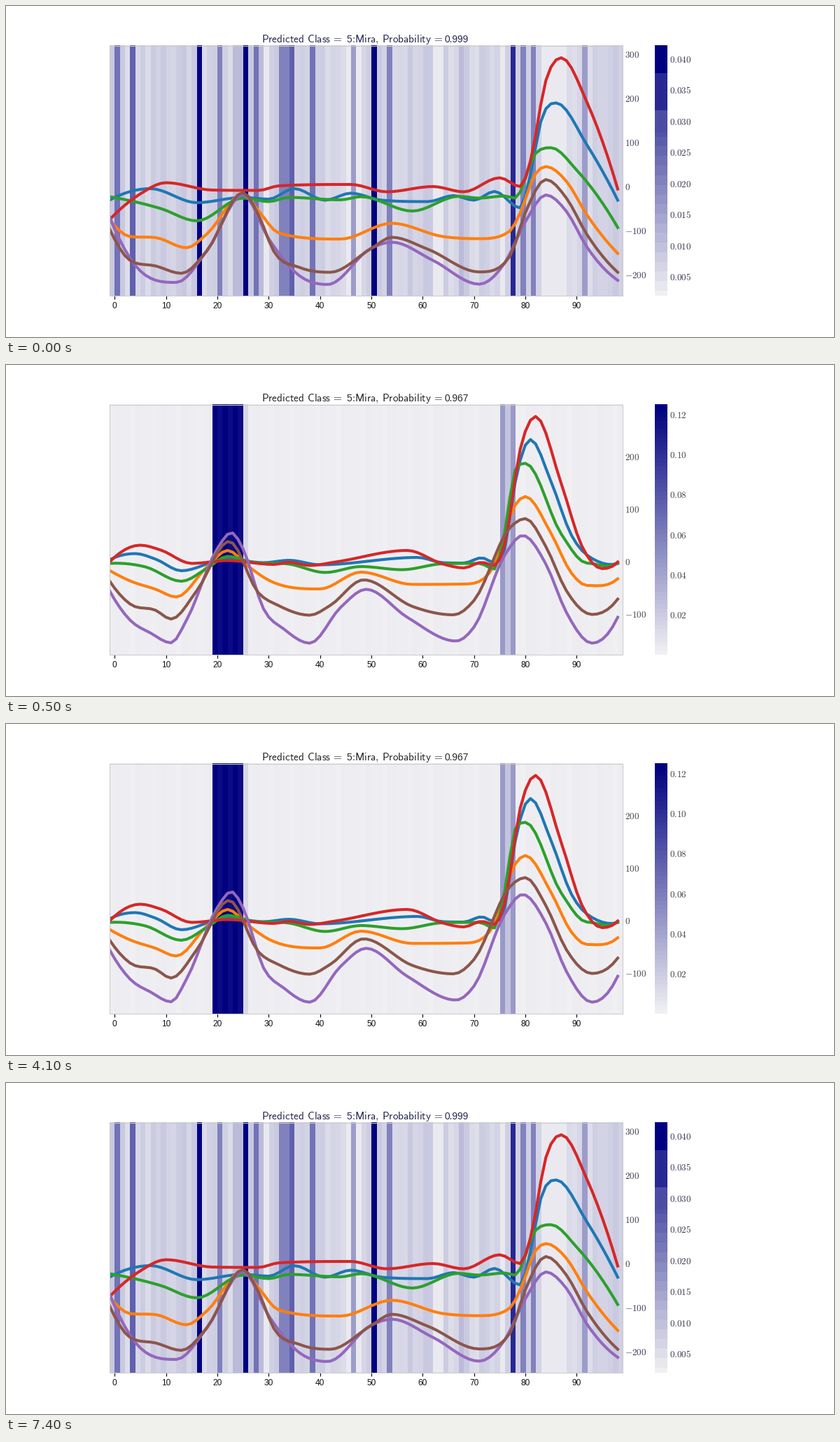
A matplotlib script that plays this animation: 1183 by 473 pixels, repeating every 8000 ms.

```python
import numpy as np
import matplotlib.pyplot as plt
from matplotlib.animation import FuncAnimation
from matplotlib.colors import LinearSegmentedColormap
from matplotlib.patches import Rectangle

plt.rcParams["mathtext.fontset"] = "cm"

W, H, DPI = 1183, 473, 100
PX = 72 / DPI                                   # points per pixel
LEFT, RIGHT = 0.125 * W, 0.745 * W
TOP, BOTTOM = 0.12 * H, 0.875 * H
STEP = (RIGHT - LEFT) / 100
BAR_LEFT = 0.78375 * W
BAR_RIGHT = BAR_LEFT + (BOTTOM - TOP) / 20
NAVY = LinearSegmentedColormap.from_list("navy", ["#f0f0f3", "#000080"])
BLUE, ORANGE, GREEN = "#1f77b4", "#ff7f0e", "#2ca02c"
RED, PURPLE, BROWN = "#d62728", "#9467bd", "#8c564b"

fig = plt.figure(figsize=(W / DPI, H / DPI), dpi=DPI, facecolor="white")
ax = fig.add_axes([0, 0, 1, 1])
ax.axis("off")
frame_box = Rectangle((LEFT, TOP), RIGHT - LEFT, BOTTOM - TOP, fill=False,
                      ec="#cccccc", lw=1.1 * PX, zorder=5)
ax.add_patch(frame_box)


def to_px(x):
    return LEFT + STEP * (np.asarray(x) + 1)


def label(x, y, body, size=9.5, color="#333333", ha="left"):
    return ax.text(x, y, body, fontsize=size, color=color, ha=ha,
                   va="baseline", family="Liberation Sans", zorder=6)


def curve(color, *keys):
    """Monotone cubic through x, y keys, sampled once per time step."""
    kx, ky = np.array(keys, float).reshape(-1, 2).T
    secant = np.diff(ky) / np.diff(kx)
    before, after = secant[:-1], secant[1:]
    limit = 3 * np.minimum(abs(before), abs(after)) * (before * after > 0)
    slope = np.gradient(ky, kx, edge_order=2)
    slope[1:-1] = np.clip(slope[1:-1], -limit, limit)

    x = np.arange(-1, 99)
    i = np.clip(np.searchsorted(kx, x, side="right") - 1, 0, len(kx) - 2)
    h = kx[i + 1] - kx[i]
    t = (x - kx[i]) / h
    ease = t * t * (3 - 2 * t)
    y = (ky[i] + (ky[i + 1] - ky[i]) * ease
         + h * t * (1 - t) * ((1 - t) * slope[i] - t * slope[i + 1]))
    line, = ax.plot(to_px(x), y + 0.5, color=color, lw=4.1 * PX, zorder=3)
    line.set_clip_path(frame_box)
    return line


def shade(levels, left, right):
    return ax.imshow(levels, cmap=NAVY, vmin=0, vmax=1,
                     extent=(left, right, BOTTOM, TOP), aspect="auto",
                     interpolation="nearest", zorder=1)


def title(prob, color):
    gap, pad = r"\hspace{0.38}", r"\hspace{0.18}"
    head = rf"$\mathsf{{Predicted}}{gap}\mathsf{{Class}}{pad}=$"
    tail = (rf"$\text{{:}}\mathsf{{Mira}}{{,}}{gap}"
            rf"\mathsf{{Probability}}{pad}=$")
    return [label(365, 51.5, head, 11, color),
            label(486.7, 51.5, "5", 9.9, color),
            label(494.5, 51.5, tail, 11, color),
            label(627, 51.5, prob, 9.9, color)]


def scale(x, y0, dy, values, fmt, color):
    return [label(x, y0 + dy * k + 4.5, f"${v:{fmt}}$", color=color)
            for k, v in enumerate(values)]


def spread_scene():
    levels = np.random.default_rng(4).uniform(0.07, 0.17, 100)
    levels[[30, 46, 48, 63, 64, 76]] = levels[84:89] = 0.03
    strong = {1: (17, 26, 51), 0.83: (78,), 0.6: (4, 35), 0.52: (1, 28, 39),
              0.46: (21, 33, 34, 54, 80, 82), 0.35: (47, 92),
              0.22: (24, 25, 29, 68)}
    for level, columns in strong.items():
        levels[list(columns)] = level
    t = np.linspace(0, 1, 357)
    bar = np.select([t < 0.11, t < 0.26, t < 0.35], [1, 0.83, 0.68],
                    np.round((1 - t) * 26) / 26)
    ink = "#3c3c55"
    return [
        shade(levels[None], LEFT, RIGHT),
        shade(bar[:, None], BAR_LEFT, BAR_RIGHT),
        *title("0.999", "#262650"),
        *scale(884, 70, 62.9, range(300, -201, -100), "d", ink),
        *scale(948, 76.5, 44.45, np.arange(8, 0, -1) * 0.005, ".3f", ink),
        curve(BLUE, -1, 277, 7, 260.5, 16, 280.5, 25, 273, 30, 275.5,
              35, 260.5, 41, 277, 46, 267, 52, 277, 61, 279, 66, 270.5,
              70, 277, 74, 264.5, 79, 288, 81, 240, 83, 165, 86, 138,
              92, 198, 98, 277),
        curve(ORANGE, -1, 305, 3, 329, 8, 330.5, 14, 345, 18, 325, 25, 268,
              28, 292, 32, 324, 44, 332.5, 54, 310, 64, 329, 71, 332,
              77, 321, 79, 295, 82, 239, 84, 229, 88, 250, 92, 298, 98, 353),
        curve(GREEN, -1, 272, 9, 289, 16, 306.5, 25, 274, 30, 279, 34, 273,
              44, 276.5, 48, 272, 58, 292.5, 67, 271.5, 71, 274, 76, 271,
              78, 274, 82, 210, 85, 202, 90, 234, 98, 316),
        curve(RED, -1, 305, 5, 268, 10, 252, 19, 262.5, 28, 263, 32, 256.5,
              46, 254.5, 53, 265, 62, 257.5, 68, 265, 75, 245, 79, 257.5,
              81, 221, 84, 106, 87, 73.5, 92, 137, 98, 261),
        curve(PURPLE, -1, 301, 4, 370, 12, 394.5, 18, 349, 25, 269, 30, 332,
              36, 385, 41.5, 397.5, 50, 345.5, 54, 337, 62, 363, 71, 397,
              76, 366.5, 80, 308, 84, 269.5, 88, 293, 92, 344, 98, 391.5),
        curve(BROWN, -1, 318, 3, 363, 8, 371, 13, 381.5, 18, 349, 25, 266,
              28, 298, 31, 350, 36, 373, 42, 380, 50, 346, 54, 330, 61, 347,
              71, 379.5, 77, 357, 80, 295, 84, 247.5, 88, 274, 92, 326,
              98, 380),
    ]


def focus_scene():
    k = np.arange(100)
    levels = 0.01 + 0.008 * np.sin(k * 2.1) * np.cos(k * 0.7)
    levels[20:26] = np.where(k[20:26] % 2, 0.95, 1)
    levels[26] = 0.1
    levels[[76, 77, 78]] = 0.36, 0.18, 0.36
    bar = np.linspace(1, 0, 60)
    ink = "#444444"
    return [
        shade(levels[None], LEFT, RIGHT),
        shade(bar[:, None], BAR_LEFT, BAR_RIGHT),
        *title("0.967", "#262626"),
        *scale(884, 131.5, 75, range(200, -101, -100), "d", ink),
        *scale(948, 71.5, 57.2, np.arange(6, 0, -1) * 0.02, ".2f", ink),
        curve(BLUE, -1, 278, 4, 269, 8, 277, 13, 293.5, 22, 276.5, 29, 282,
              34, 278.5, 40, 285, 59, 274.5, 64, 282, 68, 282.5, 71.5, 275,
              74, 282, 76, 262, 78, 168, 81, 106, 85, 166, 89, 243, 93, 276,
              98, 283),
        curve(ORANGE, -1, 293, 3, 308, 8, 320, 12, 331, 18, 288, 22, 264.5,
              26, 287, 30, 307, 40, 319.5, 48, 295.5, 58, 313, 68, 312.5,
              74, 285, 78, 200, 80, 187.5, 85, 240, 89, 297, 92, 314.5,
              98, 305),
        curve(GREEN, -1, 283, 6, 288, 13, 308.5, 18, 290, 22, 273, 27, 281.5,
              34, 284, 41, 296, 48, 287.5, 56, 292, 64, 283.5, 71, 283,
              74, 291, 76, 238, 78, 150, 80, 140, 87, 241, 92, 282.5,
              98, 283),
        curve(RED, -1, 281, 5, 257, 9, 264, 15, 283, 22, 279, 31, 284.5,
              34, 281.5, 38, 286, 43, 281, 57, 264.5, 64, 284, 68, 289.5,
              71.5, 281.5, 74, 286, 76, 255, 79, 120, 82, 73, 87, 169,
              91, 258, 95, 290.5, 98, 281),
        curve(PURPLE, -1, 322, 3, 364, 7, 382.5, 11, 396.5, 14, 364, 20, 262,
              22.7, 239, 25, 262, 29, 348, 33, 377, 38, 397, 44, 346,
              49, 320, 57, 360, 66.5, 394, 70, 374, 76, 271, 79.5, 243,
              84, 284, 88, 353, 93, 397, 98, 360),
        curve(BROWN, -1, 308, 3, 341, 8, 350, 11, 362.5, 16, 322, 22.3, 251.5,
              28, 325, 32, 343.5, 38, 357, 42, 343, 48.5, 306.5, 58, 344.5,
              66, 356.5, 70, 336, 77, 232, 80, 219, 84, 259, 88, 322,
              93, 356, 98, 334),
    ]


for tick in range(0, 100, 10):
    x = to_px(tick)
    ax.plot([x, x], [BOTTOM + 0.5, BOTTOM + 5], color="black", lw=1.1 * PX,
            solid_capstyle="butt")
    label(x, 431.5, str(tick), 8.6, "#111111", "center")

scenes = [spread_scene(), focus_scene()]
ax.set(xlim=(0, W), ylim=(H, 0))
ax.set_aspect("auto")


def update(i):
    active = 1 if 1 <= i < 13 else 0
    for k, parts in enumerate(scenes):
        for part in parts:
            part.set_visible(k == active)
    return []


anim = FuncAnimation(fig, update, frames=16, interval=500, repeat=True,
                     repeat_delay=0, init_func=lambda: update(0))
plt.show()
```
